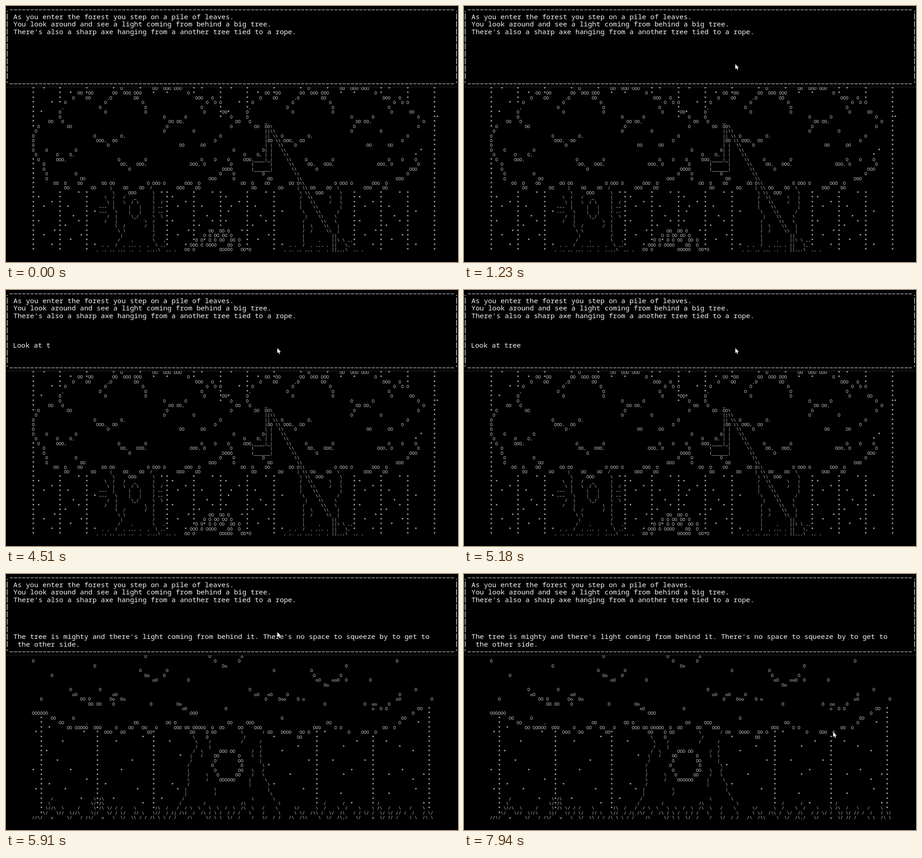
These frames come from a looping animation (993x564 px, 8 s). An HTML page with a canvas:

```html
<!DOCTYPE html>
<html>
<head>
<meta charset="utf-8">
<style>
html, body { margin: 0; width: 100%; height: 100%; overflow: hidden; background: #000; }
canvas { display: block; }
</style>
</head>
<body>
<canvas id="stage" width="993" height="564"></canvas>
<script>
const W = 993, H = 564, LOOP = 8000;
const FONT = '"Noto Sans Mono", monospace';

// In the drawings "~" is a tab to the next multiple of ten columns.
const CANOPY = String.raw`
    *~~~   O~     OO  O~OO OOO~   *
~    *  OO~*OO~OO  OOO OO~O    *~*       O~*
~     O~OO      ,O~        OO~~~ OOO   O
       *~  O~       O~~ O~~     O  O~O
~ ,~     O~~  O~~   O
   *~O~       O~~  O~~    O~ OO
~O~~~         O~       O~~    O
      OO~ O~~~~ OO OO,~~      O
  O~   OO~~~~O~~    O
 O~~~~         O~~O
O~~   O~   O,~~~~O
O~~    OOO,~OO~~~        O
O~~        O~~~     OO~   OO
O    O~      O
 O       O~    O,
  O      O~OO,~~  O~  O~~   O    O~   O
    O~~~   OO,   O~OO,~         O~OO, O~    O
    O~~~      O~~~~ OOO
     O~      O~~~~~~O
     O~        OO~~~~~      OOO
        OO~  O    OO~      OO O~O~   O OOO O~       OOO~  O
~  OO~  OO~    OO~OO~    OOO~ OO
~~~      OOO
`;

const LEFT_TRUNK = String.raw`
         |~~    /
~\~     \  *
       \~/   /   _~     |
        \~|   \  / \~     \  /
     –––~|     |~|    | ––
     –––~ \    |~|    / ––
        /~ |     \_/~     \  \
       /~ |~  \  /
~ \  /~  /  |
~  \ \~     \
~   |~     /
~  /    ,~     \   ,
      , ,~ /  , ,,,~,  ,  \ ,,
    , ., ,~, ,,, .,~,  ,.,,\~,, ,
`;

const RIGHT_TRUNK = String.raw`
         |~~    \
~\~     \
~/~ \   |
~|~ /   \
~|~     |
~ \~    /
~  |~   \
~ /~   \
~ |  \~    |
~ /  /~    |
~ |~  ||
~ |     ,~  ||\ \ ,,
      , ,~ /  , ,,,~, ||   \,
    , ,. ,~, ,,, .,~, ||,,,\~,, ,
`;

const AXE = String.raw`
       _
       OO\
       ||
       ||
       |OO
       | |
       | |
       | |
   ____|_|
  (      |
  (______|
`;

const LEAVES = String.raw`
~      OO~OO O
~    O O OO~ OO O
~ O O  O O~OO  OO O
         O~OO O OOOO~   OO  O
       OO~O~OOOOO   OO~ O
`;

const BIG_TREE = String.raw`
~~~~  O~~      O~        o
O~~~~~~        O~       O~~~~~~      O
~~   O~~~~~ Oo~~~~       O
~~~~O~O~~~~O~    O
       O~~~~  Oo     O~~~~~~     O~     O
~~~~     oO~        O~~~~~      oO~  ooO  O~      O
~~~~~~~~~~         O~o
~    O~     O~~~~~~ O~~~~~~   O
~     oO~~oO~~~~~   oO   oO~     O~~~~       O
   O~        OO~ O       O~o  Oo~~~~~       O~  Ooo    O~ o~~~      oO~         O
~~ OO OO~O~    O~    Oo~~~~~         O~~    O  oo~   O
~~~~~      oO~~  O~~~~~       o~O O~    OO
OOOOOO~~~~~         O~OO~~~~~~~~  O
       OO~     O~~~~~~~~   O~~~~        OO
~OO~,~        OO~~OO O~~   OO~OOO~~~OO~~       O~    *
      *~   OO OOOO~O  OOO~ O    OO~ OO   O~   OOO OO~OOOOO  O~OO     OO~   OOO~~     OOO~   O O~~ OO  O
 *~         *~       OOO~   OO~   OO~         O~O    O OO~        \~      / OO~   OOOO~OO O     *~        O~   OOO  O
~~~~ *~~\    O~         /~~*        O~O
~ *~~ *~~ *~ \    /~        /~     /~~~~ *~  *
~~~~~~ /    |~~     \~         *~~      *~~       *
     *~~~~~~/  \~OOO OO~  /  /~   *~~~~~  *
~~~~~     *   |~   /    OO~       O~  \  \
         *~~~       *~~         /~        O~       OO~     |~~   *~  *~    *
~~~~~        /~       O~        O~      \ *
*~    *~~   *~~        |~        O~       OO~  \   /~~~         *~~        *
~~~~~        /~     \   O~      OO~  /   \~      *~~      *~~   *~      *
~~*~~~        \~     /~OOOOOO~ |     \~~~~~~  *
      *~~       *~~~  *     /~~~ |      \~*
 *~  *~~         *~~    *  |~        \~~        |~~ *~~~~   *
~~~~~       |~        /~~         \~~~     *~~   *
       /~        *~   \ /\~*~        *~      /~~~  \~\
      \~~  \/ /\~~ *~     /~    /~        /\~~  \~         /~      /  *~         /~~      *
     \//\~ \     /~   \ /\ \/~ / /    \~      /\~/   /  / \~  \   \  \~  /  \  /\~  \   /~ \      \/~      \  /~    \  /~  \    \ /~\  /   \~ /    \
    \/   \~//  \//\~  \|/   \/~ / \/   //~ \   \//~/ /| /\/~/  /\ / \~/  / / /~ \    /~  \     \~\/  /\\ /~ \/  /\~/ / \/ /~\/ \/ // /~  /   / \/
//\/   v~   \/   /~/\/   v~\  \/  \\~/ / /\ \ \~ / /    /\~     \/ \~\  \/  /~  /   \/~/ /   /\~/\\    \~\/  /\,/~ \/    v~\/ // /~ \ \  /\ \
`;

const newGrid = () => Array.from({ length: 35 }, () => []);

function stamp(grid, art, row, col, firstCol = 0) {
  art.split('\n').slice(1, -1).forEach((line, r) => {
    const text = line.split('~').map(s => s.padEnd(10)).join('');
    [...text].forEach((ch, c) => {
      if (ch !== ' ' && c >= firstCol) grid[row + r][col + c] = ch;
    });
  });
}

function star(grid, row, col) {
  grid[row][col] ??= '*';
}

function forest() {
  const g = newGrid();
  stamp(g, CANOPY, 0, 70, 3);
  stamp(g, CANOPY, 0, 0);
  stamp(g, LEFT_TRUNK, 21, 20);
  stamp(g, RIGHT_TRUNK, 21, 90);
  stamp(g, LEAVES, 30, 50);
  stamp(g, AXE, 7, 80);
  for (let r = 9; r < 31; r++) g[r][80 + r] = g[r][81 + r] = '\\';
  const skyEnd = { 0: 9, 10: 4, 70: 7, 80: 7, 140: 4, 150: 22 };
  for (let c = 0; c <= 150; c += 10) {
    for (let r = 0; r < 35; r++) {
      const trunk = [30, 40, 100, 110].includes(c) || (c === 70 && r > 29);
      const start = c === 0 ? 15 : 22;
      if (r < (skyEnd[c] ?? 1) || (r >= start && !trunk)) star(g, r, c);
    }
  }
  const scatter = [[17], [2], [7], [4, 13], [23], [15], [2, 17], [12], [8], [4, 18], [14], [7, 23]];
  scatter.forEach((cols, i) => cols.forEach(c =>
    [0, 50, 70, 120].forEach(shift => star(g, 22 + i, c + shift))));
  star(g, 6, 151);
  star(g, 13, 145);
  star(g, 14, 143);
  return g;
}

function bigTree() {
  const g = newGrid();
  stamp(g, BIG_TREE, 0, 0);
  [[3, 13], [24, 16], [45, 16], [106, 16], [127, 17], [148, 11]].forEach(([c, top]) => {
    for (let r = top; r < 34; r++) star(g, r, c);
  });
  return g;
}

function render(grid) {
  const layer = document.createElement('canvas');
  layer.width = W;
  layer.height = H;
  const g = layer.getContext('2d');
  g.rect(0, 179, W, H);
  g.clip();
  g.font = '9.795px ' + FONT;
  g.textAlign = 'center';
  grid.forEach((row, r) => row.forEach((ch, c) => {
    g.fillStyle = ch === '*' ? '#fff' : '#ccc';
    g.fillText(ch, 60 + c * 5.877, 185 + r * 10.45);
  }));
  return layer;
}

const scenes = [render(forest()), render(bigTree())];
const ctx = document.getElementById('stage').getContext('2d');
const CELL = 9.14, LINE = 16.35;

function write(text, row, x = 16.3) {
  [...text].forEach((ch, i) => ctx.fillText(ch, x + i * CELL, 12.5 + row * LINE));
}

function drawFrame() {
  for (let c = 1; c < 108; c++) {
    const x = 2.6 + c * CELL - 3.5;
    ctx.fillRect(x, 8, 7, 1);
    ctx.fillRect(x, 171, 7, 1);
  }
  for (const x of [2.6, 989.7]) {
    for (let r = 1; r < 10; r++) ctx.fillRect(x - 0.6, r * LINE + 0.4, 1.3, 13.5);
    write('.', 0, x - CELL / 2);
    write("'", 10, x - CELL / 2);
  }
}

const INPUT = 'Look at tree';
const KEY_TIMES = [2290, 2690, 2890, 3100, 3400, 3830, 3960, 4200, 4510, 4710, 4980, 5180];

const mix = (a, b, p) => a.map((v, i) => v + (b[i] - v) * p);
const ease = p => p * p * (3 - 2 * p);
const REST = [596, 128], LAST = [811, 348];

function cursorAt(t) {
  if (t < 200) return null;
  if (t < 970) {
    const p = Math.floor((t - 200) / 77) / 10;
    return p < 0.5 ? mix([986, 492], [0, 300], ease(p * 2))
                   : mix([0, 300], [575, 122], ease(p * 2 - 1));
  }
  if (t < 1100) return [582, 122];
  if (t < 1230) return [590, 125];
  if (t < 7310) return REST;
  return mix(REST, LAST, ease(Math.min(1, (Math.floor((t - 7310) / 70) + 1) / 10)));
}

const ARROW = new Path2D('M0 0V11.2L2.6 8.8L4.4 13L6.3 12.2L4.5 8.2H8Z');

function drawCursor([x, y]) {
  ctx.save();
  ctx.translate(x, y);
  ctx.strokeStyle = '#000';
  ctx.stroke(ARROW);
  ctx.fill(ARROW);
  ctx.restore();
}

function draw(t) {
  ctx.fillStyle = '#000';
  ctx.fillRect(0, 0, W, H);
  ctx.drawImage(scenes[t < 5910 ? 0 : 1], 0, 0);
  ctx.fillStyle = '#2a2a2a';
  ctx.fillRect(0, 178, W, 1);
  ctx.fillStyle = '#f4f4f4';
  ctx.font = '15.23px ' + FONT;
  drawFrame();
  write('As you enter the forest you step on a pile of leaves.', 1);
  write('You look around and see a light coming from behind a big tree.', 2);
  write("There's also a sharp axe hanging from a another tree tied to a rope.", 3);
  if (t < 5840) {
    write(INPUT.slice(0, KEY_TIMES.filter(k => k <= t).length), 7, 15.3);
  } else {
    write("The tree is mighty and there's light coming from behind it. There's no space to squeeze by to get to", 8);
    write(' the other side.', 9);
  }
  const cursor = cursorAt(t);
  if (cursor) drawCursor(cursor);
}

const start = performance.now();
function tick() {
  draw((performance.now() - start) % LOOP);
  requestAnimationFrame(tick);
}
tick();
</script>
</body>
</html>
```
